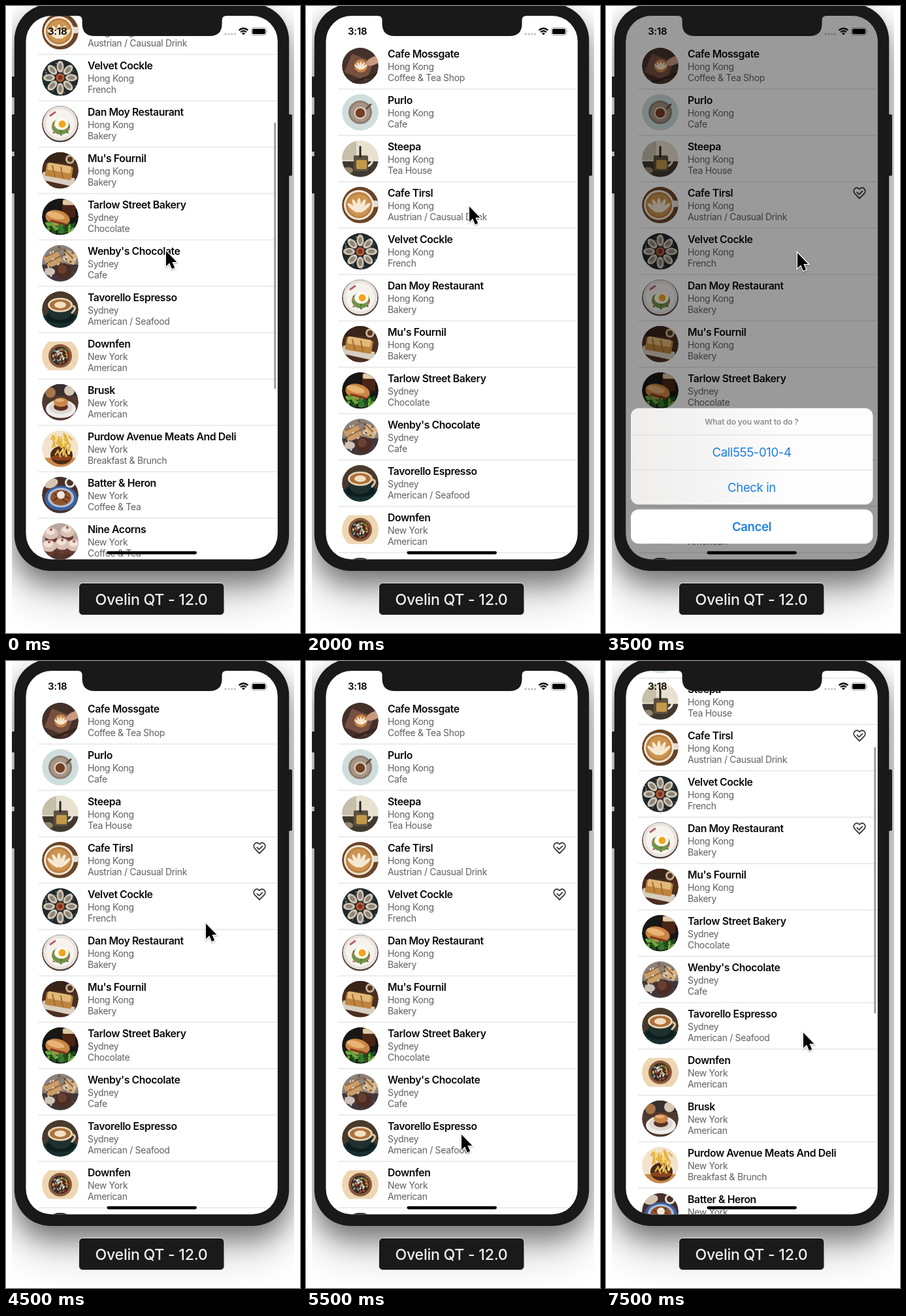
Write an HTML page that moves like this. It is 450x960 px and loops after 8000 ms.

```html
<!DOCTYPE html>
<html lang="en">
<head>
<meta charset="utf-8">
<title>Restaurant list</title>
<style>
html, body { margin: 0; width: 100%; height: 100%; overflow: hidden; background: #fff; }
#stage { position: absolute; left: 0; top: 0; width: 450px; height: 960px; overflow: hidden; }
#shade { position: absolute; left: 9px; top: 0; width: 432px; height: 960px; overflow: hidden;
  border-radius: 0 0 60px 60px / 0 0 24px 24px; }
#shade i { position: absolute; left: 4px; top: -3px; width: 420px; height: 868px; border-radius: 55px;
  box-shadow: 0 18px 36px rgba(0,0,0,.4), 0 38px 64px rgba(0,0,0,.24); }
svg { position: absolute; left: 0; top: 0; }
text { font-family: Inter, Roboto, "Liberation Sans", sans-serif; }
.title { font-size: 15.8px; font-weight: 600; letter-spacing: -.42px; fill: #0a0a0a; }
.sub { font-size: 14px; letter-spacing: -.32px; fill: #606060; }
.action { font-size: 18.6px; letter-spacing: -.4px; fill: #1c7fe6; text-anchor: middle; }
.bold { font-weight: 600; }
</style>
</head>
<body>
<div id="stage">
  <div id="shade"><i></i></div>
  <svg width="450" height="960" viewBox="0 0 450 960">
    <defs>
      <clipPath id="screen"><rect x="30.5" y="15" width="385.3" height="832.3" rx="39"/></clipPath>
      <clipPath id="round"><circle r="28"/></clipPath>
      <linearGradient id="frost">
        <stop offset="0" stop-color="#efeeed"/><stop offset=".35" stop-color="#f5f5f5"/>
        <stop offset=".65" stop-color="#fdfdfd"/>
      </linearGradient>
    </defs>
    <g fill="#1c1c1c">
      <rect x="9" y="108" width="8" height="32" rx="1"/>
      <rect x="9" y="166" width="8" height="57" rx="1"/>
      <rect x="9" y="230" width="8" height="57" rx="1"/>
      <rect x="430" y="166" width="8" height="94" rx="2"/>
      <rect x="12.8" y="-3" width="420.4" height="868" rx="55" fill="#191919"/>
    </g>
    <g clip-path="url(#screen)">
      <rect x="30" y="15" width="386" height="833" fill="#fff"/>
      <g id="list"></g>
      <rect id="bar" x="410.3" width="2.8" height="408" rx="1.4" fill="#999"/>
      <text x="64" y="44" font-size="15" font-weight="600" letter-spacing="-.2">3:18</text>
      <g fill="#c4c4c4">
        <circle cx="336" cy="43" r="1.7"/><circle cx="341" cy="43" r="1.7"/>
        <circle cx="345.7" cy="43" r="1.7"/><circle cx="350.5" cy="43" r="1.7"/>
      </g>
      <g fill="none" stroke="#000" stroke-width="2.3">
        <path d="M356.5 37.2Q363.5 31.2 370.5 37.2"/><path d="M359.1 40Q363.5 36.2 367.9 40"/>
        <path d="M361 41.8Q363.5 39.8 366 41.8L363.5 44.4Z" fill="#000" stroke="none"/>
      </g>
      <rect x="375.5" y="33.5" width="23" height="11" rx="3" fill="none" stroke="#999" stroke-width="1"/>
      <rect x="377" y="35" width="20" height="8" rx="1.7"/>
      <path d="M399.7 37Q401.5 39 399.7 41Z" fill="#999"/>
      <g id="modal">
        <rect x="30" y="15" width="386" height="833" opacity=".395"/>
        <g id="sheet">
          <rect x="38" y="607.5" width="370.5" height="147.5" rx="12" fill="url(#frost)"/>
          <path d="M38 648.5H408.5M38 702H408.5" stroke="#dcdcdc" stroke-width="1"/>
          <text x="223" y="633" text-anchor="middle" font-size="12" font-weight="600" letter-spacing="-.12" fill="#8f8f8f">What do you want to do ?</text>
          <text id="call" class="action" x="223" y="682"></text>
          <text class="action" x="223" y="735.5">Check in</text>
          <rect x="38" y="762.5" width="370.5" height="52.5" rx="12" fill="#fff"/>
          <text class="action bold" x="223" y="795.5">Cancel</text>
        </g>
      </g>
      <rect x="154.5" y="834.7" width="137.5" height="4.8" rx="2.4"/>
    </g>
    <path d="M110 14H337.4V15Q330.6 15.3 330.6 21.5V27Q330.6 46 311.6 46H135.6Q116.6 46 116.6 27V21.5Q116.6 15.3 110 15Z" fill="#191919"/>
    <rect x="111.5" y="883.5" width="222.5" height="49" rx="6" fill="#1a1a1a" stroke="#e4e4e4"/>
    <text x="222.5" y="917.3" text-anchor="middle" font-size="23.2" font-weight="500" letter-spacing="-.3" fill="#eee">Ovelin QT - 12.0</text>
    <g id="cursor">
      <path id="arrow" d="M0 0V23.5L5.2 18.6L9 27.4L13.2 25.6L9.4 17H16.4Z" stroke="#fff" stroke-width="2.6" paint-order="stroke"
        style="filter: drop-shadow(.6px 1.6px 1px rgba(0,0,0,.35))"/>
    </g>
  </svg>
</div>
<script>
const $ = id => document.getElementById(id);

// Thumbnail shapes, centred on 0,0
const dot = (x, y, r, fill) => `<circle cx="${x}" cy="${y}" r="${r}" fill="${fill}"/>`;
const oval = (x, y, rx, ry, fill, turn = 0) =>
  `<ellipse rx="${rx}" ry="${ry}" fill="${fill}" transform="translate(${x} ${y}) rotate(${turn})"/>`;
const box = (x, y, w, h, fill, turn = 0) =>
  `<rect x="${x}" y="${y}" width="${w}" height="${h}" rx="2" fill="${fill}" transform="rotate(${turn})"/>`;
const line = (d, color, width) => `<path d="${d}" fill="none" stroke="${color}" stroke-width="${width}" stroke-linecap="round"/>`;
const base = fill => dot(0, 0, 28, fill);
const ring = (n, r, draw) => Array.from({ length: n }, (_, i) => {
  const a = i * 2 * Math.PI / n;
  return draw(r * Math.cos(a), r * Math.sin(a), a * 180 / Math.PI, i);
}).join("");
const leaf = (x, y, s) => [-50, -25, 0, 25, 50].map(a =>
  `<g transform="translate(${x} ${y}) rotate(${a}) scale(${s})">${oval(0, -9, 2.2, 8, "#f6e8d2")}</g>`).join("");

let seed = 7;
const rand = (lo, hi) => lo + (hi - lo) * ((seed = seed * 16807 % 2147483647) / 2147483647);
// Small crumbs of mixed colour scattered in an ellipse
const crumbs = (n, x, y, rx, ry, size, colors) => Array.from({ length: n }, (_, i) => {
  const a = rand(0, 2 * Math.PI), r = Math.sqrt(rand(0, 1));
  return oval(x + rx * r * Math.cos(a), y + ry * r * Math.sin(a), size, size * .6, colors[i % colors.length], rand(0, 180));
}).join("");
const fries = (n, x, y, w, h) => Array.from({ length: n }, (_, i) =>
  line(`M${x + rand(-w, w)} ${y + rand(-h, h)}l${rand(-5, 5)} ${rand(5, 11)}`, i % 3 ? "#e3b040" : "#f6da84", 2.4)).join("");

const art = [
  base("#44312a") + box(-19, -13, 36, 31, "#765040", 22) + box(-28, 18, 56, 4, "#35251f", -20) +
    dot(1, 0, 10, "#c98549") + leaf(1, 6, .75) + oval(21, -8, 13, 6, "#c99a80", -25),
  base("#cfdedd") + dot(0, 0, 18, "#8d7c70") + dot(0, 0, 15, "#a69484") + dot(0, 1, 9.5, "#d9cec2") +
    dot(0, 1, 7.3, "#743f25") + line("M10 -6L16 -12", "#5c4c42", 3),
  base("#e8e1cf") + box(-28, -28, 22, 30, "#c6bfaa") + box(-28, 4, 56, 26, "#40392f") + box(-10, -5, 22, 24, "#5b5140") +
    box(-6, 2, 16, 14, "#c39a48") + line("M0 -18V-3", "#27231f", 3) + line("M14 -3Q23 4 13 11", "#e9e6df", 3) + oval(-19, 18, 8, 5, "#94866a"),
  base("#6a4528") + oval(20, -2, 14, 5, "#e8ddd0") + dot(-2, 0, 23, "#f1e6d7") + dot(-2, 0, 20, "#bd8141") + dot(-2, 0, 17, "#cc9551") + leaf(-2, 12, 1.35),
  base("#202a2b") + crumbs(30, 0, 0, 27, 27, 1.5, ["#59635a", "#8a857a"]) +
    ring(8, 17, (x, y, a) => oval(x, y, 9, 5.5, "#d2c6b6", a) + oval(x, y, 5.5, 3, "#8c8576", a)) +
    dot(0, 0, 6.5, "#b35c35") + dot(0, 0, 3.5, "#7d2d22"),
  base("#493d39") + dot(0, -1, 26.5, "#e9e2dc") + dot(0, -1, 22, "#f6f3ef") + oval(1, 4, 14, 12, "#739349") +
    crumbs(20, 0, 6, 15, 11, 2, ["#b88452", "#4f7332", "#c9685a"]) + oval(2, 0, 11, 9, "#fffaf0") + dot(3, 0, 5.5, "#f1a51d") + line("M-15 -13L-8 -18", "#b56170", 3),
  base("#4b2f20") + box(-28, -28, 56, 16, "#382419") + dot(15, -17, 7, "#c7b295") + dot(15, -17, 4, "#54351f") +
    box(-25, 7, 50, 13, "#d8cec1", 12) + box(-22, -8, 41, 20, "#bd843d", 10) + box(-20, -9, 36, 11, "#e2b878", 10) + line("M-12 -7L-8 9M1 -5L4 11", "#a46a30", 2),
  base("#171716") + box(3, -26, 20, 27, "#4a2415") + box(4, -26, 19, 8, "#dfcaa5") + oval(-4, 2, 19, 12, "#c98543", 15) +
    oval(-7, -2, 14, 5, "#e8b375", 15) + crumbs(36, 0, 16, 25, 8, 4, ["#34772d", "#6ca83e", "#1f4d1e"]) + line("M-14 6L9 12", "#86331e", 3),
  base("#8b817b") + box(-28, 2, 56, 28, "#41373a") + box(-20, -19, 24, 19, "#ca9d68", -24) + box(0, -23, 20, 17, "#d6b383", 25) +
    line("M-22 -10L2 -22M-17 -2L7 -14M5 -22L20 -7", "#8b633e", 2) + crumbs(24, 0, 0, 27, 25, 2, ["#e0d4c8", "#5b4a44"]) +
    dot(5, 12, 12, "#4c2c23") + dot(3, 9, 7, "#68402f") + oval(-16, 13, 8, 6, "#d0c4b9"),
  base("#493a2d") + oval(0, 16, 28, 15, "#17302f") + oval(0, 12, 22, 9, "#0c1e1e") + oval(0, 1, 18, 15, "#20302e") +
    oval(0, -7, 19, 11, "#ead7b9") + oval(0, -7, 16, 8.5, "#ad713c") + oval(0, -7, 9, 5, "#f2dfc3") + line("M18 -6Q27 -4 18 5", "#d8c7ad", 3),
  base("#fff") + box(-28, -22, 56, 44, "#eed6b2") + dot(0, 0, 18, "#8a5a3c") + dot(0, 0, 14, "#382b26") +
    crumbs(46, 0, 0, 12, 12, 2, ["#bd3528", "#eee0c7", "#66843c", "#d6953b", "#7aa3b3"]),
  base("#51392f") + box(-28, -28, 56, 18, "#383030") + dot(-15, -15, 8, "#a87448") + dot(14, -18, 8, "#d7c6b2") +
    oval(1, 10, 23, 14, "#f0eeeb") + oval(1, 8, 18, 10, "#dcd7d1") + oval(1, 7, 11, 6, "#5c3021") + oval(1, 0, 11, 7, "#c88748") + oval(-1, -3, 7, 2.5, "#e5b276"),
  base("#f3e3cc") + box(-28, 14, 56, 16, "#c88a48") + oval(2, 10, 17, 14, "#4d2818") + oval(2, 14, 16, 4, "#8a451f") +
    fries(34, 1, -15, 13, 9) + fries(10, 6, 0, 10, 4),
  base("#46302a") + oval(-14, -18, 11, 7, "#d6c4b3", -20) + dot(15, -19, 8, "#e6e2de") + dot(15, -19, 5, "#4d3022") +
    oval(1, 5, 25, 19, "#3b63a0") + oval(1, 4, 20, 15, "#aebfd9") + oval(1, 4, 16, 12, "#92532c") + line("M-9 -2L10 11M-4 -6L13 5M-10 8L9 -5", "#67331e", 2) + dot(1, 0, 6, "#f0e7df"),
  base("#b8a59d") + box(-28, 12, 56, 18, "#53342d") + [[-14, -12], [11, -15], [-17, 7], [3, 4], [21, 6]].map(([x, y]) =>
    oval(x, y + 8, 9, 8, "#673b30") + oval(x, y, 11, 9, "#d9c1b4") + oval(x - 1, y - 3, 7, 5, "#f1e1d8") + dot(x, y - 6, 2, "#a25b55")).join(""),
  base("#33302e") + box(-28, -28, 56, 20, "#5b5048") + oval(2, 11, 24, 14, "#e4dfd8") + oval(2, 9, 17, 9, "#b87b43") + oval(0, 5, 9, 5, "#e3c58d") + line("M-20 -13L1 0", "#d9d4ce", 2),
  base("#6a5547") + dot(0, 2, 19, "#e9e2d6") + dot(0, 2, 12, "#a8683b"),
  base("#2f3534") + oval(0, 5, 22, 14, "#d9c8ae") + oval(0, 3, 14, 8, "#a44f32")
];

const rows = `Cafe Mossgate|Hong Kong|Coffee & Tea Shop
Purlo|Hong Kong|Cafe
Steepa|Hong Kong|Tea House
Cafe Tirsl|Hong Kong|Austrian / Causual Drink
Velvet Cockle|Hong Kong|French
Dan Moy Restaurant|Hong Kong|Bakery
Mu's Fournil|Hong Kong|Bakery
Tarlow Street Bakery|Sydney|Chocolate
Wenby's Chocolate|Sydney|Cafe
Tavorello Espresso|Sydney|American / Seafood
Downfen|New York|American
Brusk|New York|American
Purdow Avenue Meats And Deli|New York|Breakfast & Brunch
Batter & Heron|New York|Coffee & Tea
Nine Acorns|New York|Coffee & Tea
Cafe Fenn|New York|Latin American
Quietwick|New York|Spanish
Sorravina|London|Spanish`.replace(/&/g, "&amp;").split("\n").map(r => r.split("|"));

$("list").innerHTML = rows.map(([name, place, kind], i) => `<g transform="translate(0 ${i * 71})">
  <rect class="press" x="30" y="56" width="386" height="71" fill="#d9d9d9"/>
  <g transform="translate(83 91.8)" clip-path="url(#round)">${art[i]}</g>
  <text class="title" x="125" y="79">${name}</text>
  <text class="sub" x="125" y="97.6">${place}</text>
  <text class="sub" x="125" y="115.2">${kind}</text>
  <rect x="49.5" y="126.6" width="366.5" height="1" fill="#dadada"/>
  <g class="heart" transform="translate(388 73)" fill="none" stroke="#3c3c3c" stroke-width="1.9" stroke-linejoin="round">
    <path d="M0 8.5L-7.5 .8C-11.5 -4 -5 -11.5 0 -5.5C5 -11.5 11.5 -4 7.5 .8Z"/><path d="M-4.2 -1.2L-.6 2.4L5 -3.2"/>
  </g></g>`).join("");
const hearts = [...document.querySelectorAll(".heart")];
const presses = [...document.querySelectorAll(".press")];

// scroll, cursor x, cursor y, sheet row, sheet drop
const STEP = 500;
const steps = [
  [266, 245, 375], [380, 248, 421], [317, 254, 643], [90, 255, 691],
  [0, 250, 307], [0, 238, 739, 3, 0], [0, 262, 521], [0, 293, 378, 4, 8.3],
  [0, 240, 731], [0, 306, 402], [0, 270, 601, 5, 0], [0, 238, 725],
  [0, 300, 741], [31, 301, 710], [100, 302, 641], [172, 302, 569]
];
const marked = n => n < 6 ? [] : n < 8 ? [3] : n < 12 ? [3, 4] : [3, 5];
const show = (el, on) => el.setAttribute("visibility", on ? "visible" : "hidden");
const move = (el, x, y) => el.setAttribute("transform", `translate(${x} ${y})`);

function pose(n) {
  const [scroll, x, y, row, drop] = steps[n];
  move($("list"), 0, -scroll);
  move($("cursor"), x, y);
  show($("bar"), scroll > 0);
  $("bar").setAttribute("y", 46 + scroll * .498);
  show($("modal"), row !== undefined);
  if (row !== undefined) {
    move($("sheet"), 0, drop);
    $("call").textContent = "Call555-010-" + row;
  }
  hearts.forEach((h, i) => show(h, marked(n).includes(i)));
  presses.forEach((p, i) => show(p, n === 12 && i === 9));
}

const start = performance.now();
let last = -1;
function tick() {
  const n = Math.floor((performance.now() - start) / STEP) % steps.length;
  if (n !== last) pose(last = n);
  requestAnimationFrame(tick);
}
tick();
</script>
</body>
</html>
```
